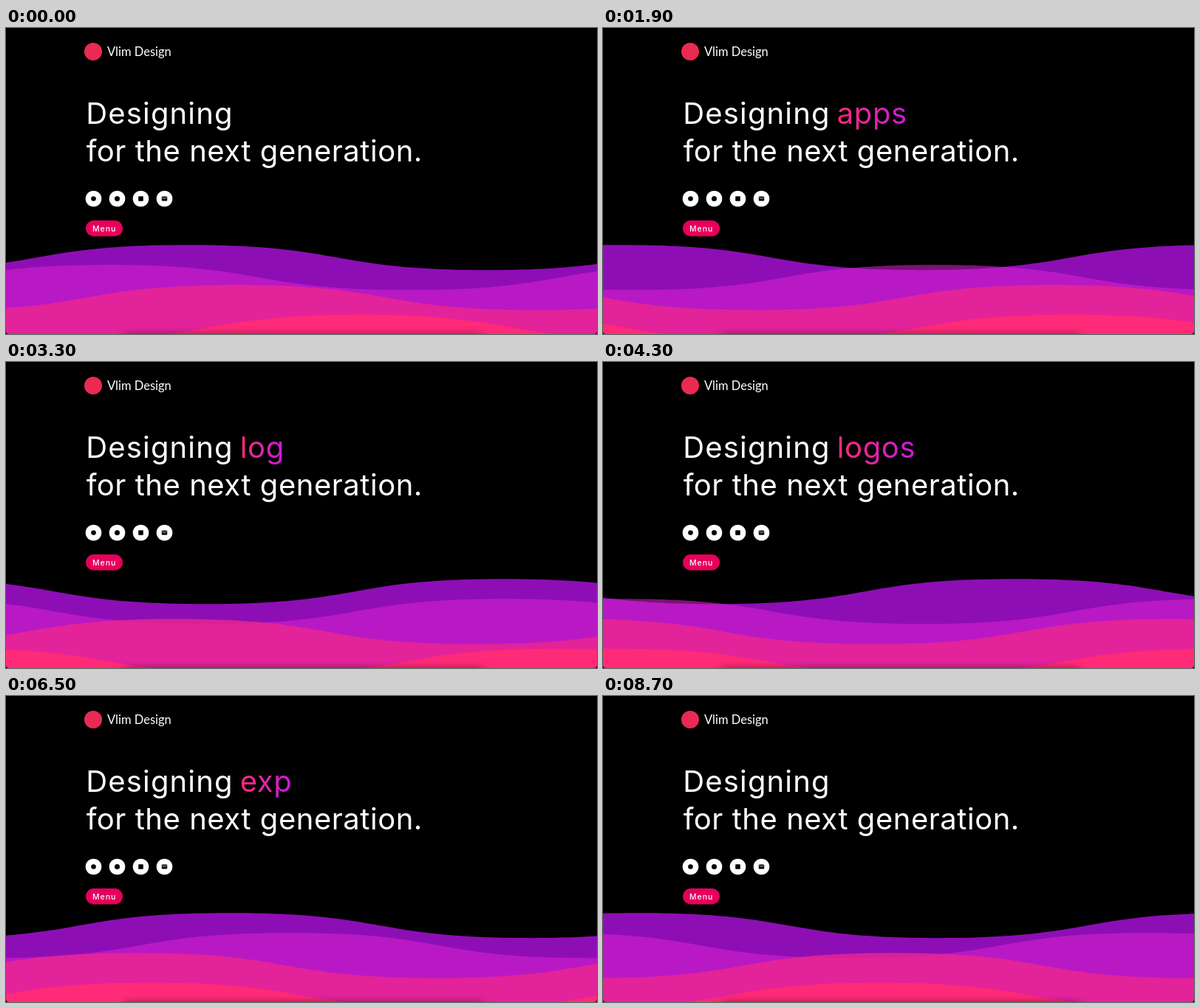
Write an HTML page that moves like this. It is 800 px wide and 415 px high and loops after 8.8 s.

```html
<!DOCTYPE html>
<html lang="en">
<head>
<meta charset="utf-8">
<title>Waves</title>
<style>
  html, body { margin: 0; width: 100%; height: 100%; overflow: hidden; background: #000; }
  svg { display: block; width: 100vw; height: 100vh; }
  text { fill: #fff; font-family: Inter, "Liberation Sans", sans-serif; }
  .headline { font-size: 40px; }
  .brand { font: 16.5px Lato, sans-serif; }
  .menu { font-size: 10.5px; font-weight: 500; letter-spacing: 1px; }
  #word { fill: url(#ink); letter-spacing: .6px; }
</style>
</head>
<body>
<svg viewBox="0 0 800 415" preserveAspectRatio="none">
  <defs>
    <linearGradient id="ink">
      <stop offset="0" stop-color="#ff2a76"/>
      <stop offset="1" stop-color="#c81bdc"/>
    </linearGradient>
    <filter id="soft" x="-10%" y="-500%" width="120%" height="1100%">
      <feGaussianBlur stdDeviation="7 4"/>
    </filter>
  </defs>
  <rect width="800" height="415"/>

  <circle cx="118" cy="32" r="12" fill="#e92a52"/>
  <text class="brand" x="137" y="38">Vlim Design</text>

  <text class="headline" x="108.3" y="130" letter-spacing="1.15">Designing</text>
  <text class="headline" id="word" x="316.8" y="130"></text>
  <text class="headline" x="108.7" y="181" letter-spacing=".53">for the next generation.</text>

  <g fill="#fff">
    <circle cx="118.5" cy="231.5" r="10.8"/>
    <circle cx="150.5" cy="231.5" r="10.8"/>
    <circle cx="182.5" cy="231.5" r="10.8"/>
    <circle cx="214.5" cy="231.5" r="10.8"/>
  </g>
  <circle cx="118.5" cy="231.5" r="3.3"/>
  <circle cx="150.5" cy="231.5" r="3.5"/>
  <rect x="179.2" y="228.2" width="6.6" height="6.6" rx=".8"/>
  <rect x="210.8" y="228.5" width="7.4" height="6" rx=".8"/>
  <path d="M211.5 229.7l3 1.9 3-1.9" fill="none" stroke="#fff" stroke-width=".8"/>

  <rect x="108" y="261" width="50" height="21.5" rx="10.75" fill="#e6005c"/>
  <text class="menu" x="117" y="275.5">Menu</text>

  <g id="waves"></g>
  <rect x="160" y="414" width="485" height="6" opacity=".4" filter="url(#soft)"/>
  <path d="M0 411a4 4 0 0 0 4 4H0zM800 411a4 4 0 0 1-4 4h4z"/>
</svg>
<script>
  const LOOP = 8800, STEP = 100;
  const PERIOD = 812, RISE = 34;

  // top: crest height, start: crest position at 0 s, turn: signed seconds per period
  const waves = [
    { top: 294.2, start: 245, turn: -7, fill: '#8e0eb5', alpha: 1 },
    { top: 321.3, start: 140, turn: 5, fill: '#da22d1', alpha: .56 },
    { top: 348.5, start: 312, turn: -3, fill: '#ed268f', alpha: .8 },
    { top: 388.7, start: 480, turn: 10, fill: '#ff2a78', alpha: 1 }
  ];

  // typing and erasing start times in ms
  const KEY = 55;
  const words = [
    { text: 'apps', type: 100, erase: 2885 },
    { text: 'logos', type: 3105, erase: 4380 },
    { text: 'brands', type: 4655, erase: 5985 },
    { text: 'experiences', type: 6315, erase: 7920 }
  ];

  function wavePath(top) {
    const h = PERIOD / 2;
    const slope = dy => `c${h * .53} 0 ${h * .47} ${dy} ${h} ${dy}`;
    return `M${-PERIOD} ${top}` + (slope(RISE) + slope(-RISE)).repeat(3) + `V430H${-PERIOD}z`;
  }

  for (const wave of waves) {
    wave.node = document.createElementNS('http://www.w3.org/2000/svg', 'path');
    wave.node.setAttribute('d', wavePath(wave.top));
    wave.node.setAttribute('fill', wave.fill);
    wave.node.setAttribute('fill-opacity', wave.alpha);
    document.getElementById('waves').append(wave.node);
  }

  const wrap = (value, size) => ((value % size) + size) % size;

  function typedAt(ms) {
    const word = words.findLast(w => ms >= w.type);
    if (!word) return '';
    const size = word.text.length;
    const typed = Math.min(size, Math.floor((ms - word.type) / KEY));
    const erased = Math.max(0, Math.floor((ms - word.erase) / KEY));
    return word.text.slice(0, Math.max(0, typed - erased));
  }

  const wordNode = document.getElementById('word');
  const origin = performance.now();

  function draw() {
    const elapsed = (performance.now() - origin) % LOOP;
    const ms = Math.floor(elapsed / STEP) * STEP;
    for (const { node, start, turn } of waves) {
      const x = wrap(start + PERIOD * ms / 1000 / turn, PERIOD);
      node.setAttribute('transform', `translate(${x} 0)`);
    }
    const text = typedAt(ms);
    if (wordNode.textContent !== text) wordNode.textContent = text;
    requestAnimationFrame(draw);
  }
  draw();
</script>
</body>
</html>
```
